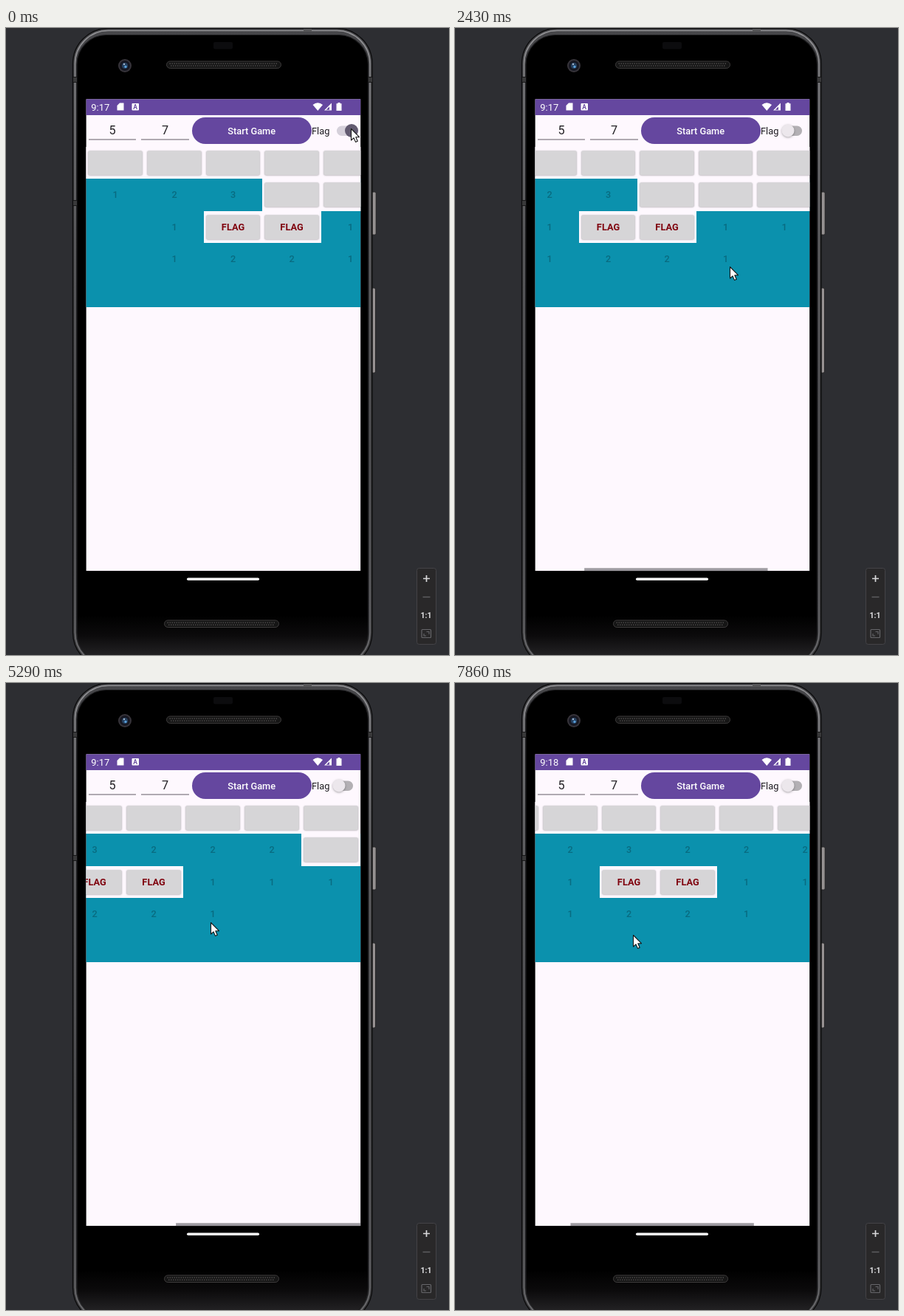
Animation of 600x849 px, one loop 8000 ms. Source, as an HTML page with a canvas:

```html
<!DOCTYPE html>
<html lang="en">
<head>
<meta charset="utf-8">
<title>Minesweeper on a phone</title>
<style>
  html, body { margin: 0; width: 100%; height: 100%; overflow: hidden; background: #2d2e32; }
  canvas { display: block; }
</style>
</head>
<body>
<canvas id="stage" width="600" height="849"></canvas>
<script>
const ctx = document.getElementById('stage').getContext('2d');
const LOOP = 8000, TICK = 1000 / 7;
const SCREEN = { x: 108.4, y: 96.2, w: 372, h: 639 };
const COL = 79.6, ROW = 43.3, GRID_TOP = 161;
const MAX_SCROLL = COL * 7 - SCREEN.w;
const PAGE = '#fef8fe', PURPLE = '#65479f', TEAL = '#0b91ad';

// Each cell is a button (#), a flag (F), blank or a count.
const ROWS = ['#######', '123222#', ' 1FF111', ' 1221  ', '       '];
const revealTick = col => 21.5 + col * 1.5;

// Pointer stops: tick, x, y
const POINTER = [
  [0, 467, 136], [5, 366, 362], [10, 287, 360], [13, 182, 350], [17, 372, 323],
  [22, 372, 320], [23, 372, 320], [26, 285, 224], [29, 438, 224], [31, 384, 302],
  [37, 277, 324], [46, 460, 341], [47, 460, 341], [51, 130, 341], [55, 241, 341]
];
// Scroll stops: tick, offset; offsets past either end stretch the board
const SCROLL = [
  [0, 0], [7, 0], [10, 79.6], [13, 185], [17, 100], [20, 107.6], [32, 107.6],
  [37, 193], [46, -26], [47, -26], [48, 0], [51, 190], [55, 72]
];

function sample(stops, tick) {
  const i = Math.max(1, stops.findIndex(stop => stop[0] >= tick));
  const a = stops[i - 1], b = stops[i];
  const f = (tick - a[0]) / (b[0] - a[0]);
  return a.map((v, k) => v + (b[k] - v) * f).slice(1);
}

function rect(x, y, w, h, fill) {
  ctx.fillStyle = fill;
  ctx.fillRect(x, y, w, h);
}

function round(x, y, w, h, r, fill, stroke, width = 1) {
  ctx.beginPath();
  ctx.roundRect(x, y, w, h, r);
  if (fill) { ctx.fillStyle = fill; ctx.fill(); }
  if (stroke) { ctx.strokeStyle = stroke; ctx.lineWidth = width; ctx.stroke(); }
}

function circle(x, y, r, fill) {
  ctx.beginPath();
  ctx.arc(x, y, r, 0, 2 * Math.PI);
  ctx.fillStyle = fill;
  ctx.fill();
}

function shape(d, fill, stroke, width = 1) {
  const path = new Path2D(d);
  if (fill) { ctx.fillStyle = fill; ctx.fill(path); }
  if (stroke) { ctx.strokeStyle = stroke; ctx.lineWidth = width; ctx.stroke(path); }
}

function label(text, x, y, size, color, weight = 400, align = 'center') {
  ctx.font = `${weight} ${size}px Roboto, sans-serif`;
  ctx.textAlign = align;
  ctx.fillStyle = color;
  ctx.fillText(text, x, y);
}

function withShadow(color, blur, dy, draw) {
  ctx.save();
  ctx.shadowColor = color;
  ctx.shadowBlur = blur;
  ctx.shadowOffsetY = dy;
  draw();
  ctx.restore();
}

function gradient(x0, y0, x1, y1, ...colors) {
  const g = ctx.createLinearGradient(x0, y0, x1, y1);
  colors.forEach((color, i) => g.addColorStop(i / (colors.length - 1), color));
  return g;
}

function speaker(x, y) {
  round(x, y, 155, 9.5, 4.7, '#161616', '#3d3b3b');
  ctx.save();
  ctx.setLineDash([1.5, 1.5]);
  shape(`M${x + 4} ${y + 3.3}h147 M${x + 5.5} ${y + 6.3}h144`, null, '#4b4848', 1.4);
  ctx.restore();
}

function drawPhone() {
  rect(0, 0, 600, 849, '#2d2e32');
  const key = gradient(495, 0, 502, 0, '#6c6a6b', '#a09b9b', '#565455');
  round(494, 222, 7.5, 58, 2, key, '#29292b');
  round(493, 352, 7.5, 115, 2, key, '#29292b');

  const rim = gradient(0, 0, 0, 849, '#47474a', '#3a3a3c', '#333335', '#3a3a3c');
  const glint = gradient(0, 0, 0, 849, '#929295', '#69696c', '#5a5a5d', '#6c6c6f');
  const face = gradient(0, 795, 0, 849, '#000', '#0b0a0b', '#222123');
  round(90.5, 0.5, 405.5, 866, 48, rim, '#0b0b0c', 1.3);
  round(93.5, 3.5, 399.5, 860, 45, null, glint, 1.6);
  round(96, 9.5, 394.5, 850, 40, face, '#1c1c1e', 1.2);
  for (const x of [91, 491]) for (const y of [66, 233]) {
    if (x > 400 && y > 100) continue;
    rect(x, y, 5, 8, '#39393a');
    rect(x, y, 5, 1, '#161617');
    rect(x, y + 7, 5, 1, '#161617');
  }
  rect(403, 1, 11, 4, '#555557');

  round(281, 19, 26, 9.5, 2, '#0c0c0e');
  circle(161, 51, 9, '#37343a');
  circle(161, 51, 7, '#171822');
  circle(161, 51, 4, '#26405f');
  circle(162, 52.5, 1.7, '#5a9fd8');
  circle(160, 49, 1.2, '#a3b8cd');
  speaker(217.5, 45);
  speaker(214.5, 802);
  round(245, 744.5, 98, 3.5, 1.75, '#fff');
}

function drawZoomPanel() {
  round(556.5, 731.5, 26, 103, 3, '#292829', '#444347');
  shape('M565 745.5h9 M569.5 741v9', null, '#d8d8da', 1.7);
  shape('M564.5 770.5h10', null, '#5f5f62', 1.4);
  label('1:1', 569, 799, 10.5, '#e0e0e2', 700);
  round(563, 814.5, 12.5, 11, 1, null, '#66666a', 1.2);
  shape('M566 820v3h3 M569.5 817.5h3.5v3.5', null, '#66666a', 1.1);
}

function drawStatusBar(clock) {
  rect(SCREEN.x, SCREEN.y, SCREEN.w, 21.8, PURPLE);
  label(clock, 115.2, 111.7, 13, '#fff', 400, 'left');
  shape('M154 101.5h5.5v10h-9v-6.5z', '#fff');
  round(170.5, 102, 9.5, 9.5, 1, '#fff');
  label('A', 175.2, 110, 8.5, PURPLE, 700);
  shape('M415.5 104Q422.3 98.5 429 104L422.3 112z', '#fff');
  shape('M441 101.5V111.5H431z', '#fff');
  shape('M438 106.5v4.3h-4.3z', PURPLE);
  shape('M449.5 101h3v1.2h2v9.8h-7v-9.8h2z', '#fff');
}

function drawToolbar(flagMode) {
  rect(112, 150.5, 64, 1, '#655f69');
  rect(183, 150.5, 65, 1, '#655f69');
  label('5', 144, 144.3, 16.3, '#222024');
  label('7', 215.5, 144.3, 16.3, '#222024');
  round(252, 121, 162, 36, 18, PURPLE);
  label('Start Game', 332.7, 144, 12.8, '#fff', 500);
  label('Flag', 414, 144, 12.8, '#1d1b20', 400, 'left');
  if (flagMode) {
    round(448, 132.5, 26, 13.5, 6.7, '#d5d0da');
    circle(468, 139, 9, '#625a70');
  } else {
    round(447, 132.5, 23, 13.5, 6.7, '#b3b0b4');
    withShadow('#0005', 3, 1, () => circle(451, 139, 8.5, '#ece7ec'));
  }
}

function drawBoard(tick) {
  const { x: left, w } = SCREEN;
  const [pull] = sample(SCROLL, tick);
  const scroll = Math.min(MAX_SCROLL, Math.max(0, pull));
  const stretch = (scroll - pull) / 2;
  const shift = u => Math.abs(stretch) * (u - 0.4 * u * u);
  // Stretching is strongest next to the edge that is being pulled.
  const place = x => stretch >= 0
    ? left + x + shift(x / w)
    : left + x - shift((w - x) / w);
  const rowTop = r => Math.round(GRID_TOP + ROW * r);

  rect(left, rowTop(1), w, 378 - rowTop(1), TEAL);
  ROWS.forEach((cells, r) => [...cells].forEach((cell, c) => {
    const x0 = Math.round(place(c * COL - scroll));
    const x1 = Math.round(place((c + 1) * COL - scroll));
    const y = rowTop(r), mid = (x0 + x1) / 2;
    const hidden = r === 1 && c > 2 && tick < revealTick(c);
    if (hidden || cell === '#' || cell === 'F') {
      rect(x0, y, x1 - x0, rowTop(r + 1) - y, PAGE);
      withShadow('#0005', 2, 0.6, () =>
        round(x0 + 3.3, y + 5.2, x1 - x0 - 6.6, 32.8, 1.8, '#d6d5d7'));
      if (cell === 'F') label('FLAG', mid, y + 26.3, 12.8, '#80040f', 700);
    } else {
      label(cell, mid, y + 26.3, 12.7, '#096b80', 500);
    }
  }));

  const barShown = (tick >= 8 && tick < 22) || tick >= 33;
  if (barShown) {
    const ratio = w / (COL * 7);
    const x0 = place(scroll * ratio), x1 = place((scroll + w) * ratio);
    rect(x0, 731.3, x1 - x0, 4, '#9d9aa0');
  }
}

function drawPointer(x, y) {
  ctx.save();
  ctx.translate(x, y);
  ctx.lineJoin = 'round';
  shape('M.5 .5V16L4 12.8L6.5 18.4L9.2 17.2L6.8 11.7H11.5z', '#fff', '#161616', 1.1);
  ctx.restore();
}

function draw(ms) {
  const tick = Math.min(55, Math.floor((ms % LOOP + 5) / TICK));
  drawPhone();
  drawZoomPanel();
  ctx.save();
  ctx.beginPath();
  ctx.rect(SCREEN.x, SCREEN.y, SCREEN.w, SCREEN.h);
  ctx.clip();
  rect(SCREEN.x, SCREEN.y, SCREEN.w, SCREEN.h, PAGE);
  drawStatusBar(tick < 40 ? '9:17' : '9:18');
  drawToolbar(tick < 1);
  drawBoard(tick);
  ctx.restore();
  drawPointer(...sample(POINTER, tick));
}

const start = performance.now();
function play() {
  draw(performance.now() - start);
  requestAnimationFrame(play);
}
play();
</script>
</body>
</html>
```
